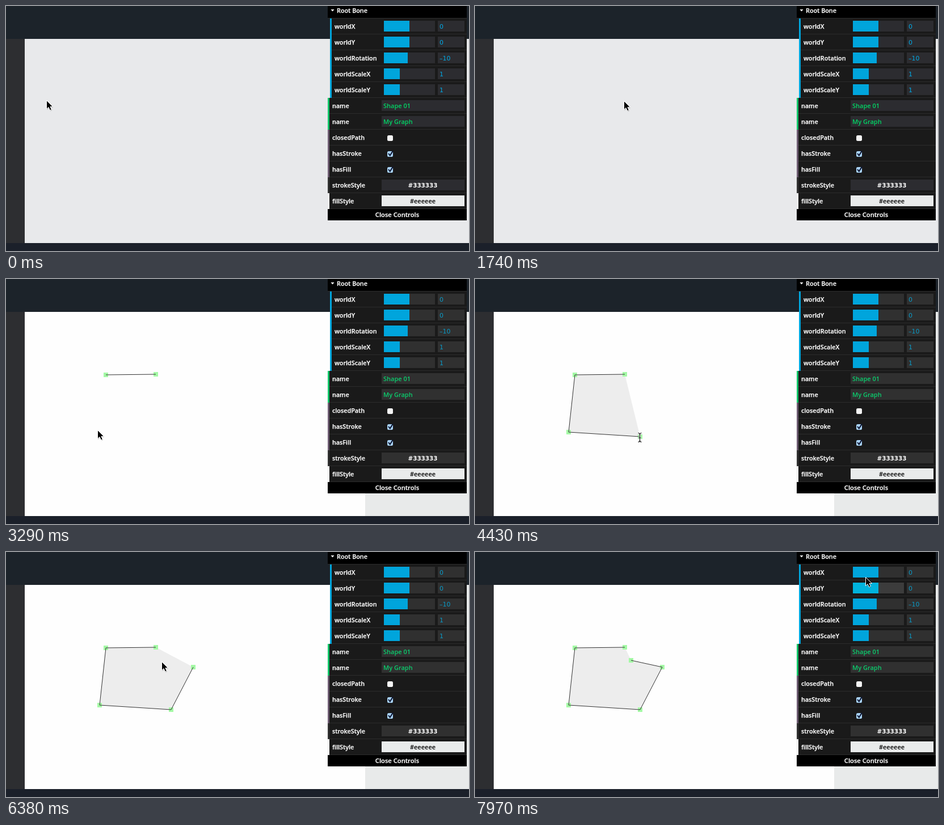
These frames come from a looping animation (816x432 px, 8 s). An HTML page:

```html
<!DOCTYPE html>
<html lang="en">
<head>
<meta charset="utf-8">
<title>Shape editor</title>
<style>
  html, body { margin: 0; width: 100%; height: 100%; overflow: hidden; background: #1c232a; }
  svg { display: block; width: 816px; height: 432px;
    --page: #e8e9eb; --field: #2c2c30; --num: #00aae6; --str: #00d866; }
  svg.drawing { --page: #e8eaea; --field: #303030; --num: #0a9bc8; --str: #0acf6e; }
  text { font: 600 10.8px "Open Sans", "Noto Sans", sans-serif; fill: #fff; }
  .row-label { stroke: #fff; stroke-width: .25; }
  .num { font: 400 11px "DejaVu Sans", sans-serif; fill: var(--num); }
  .str { fill: var(--str); font-size: 11px; }
  .hex { font: 700 10.4px "DejaVu Sans", sans-serif; }
  .dark { fill: #000; font-size: 11px; }
  .mid { text-anchor: middle; }
  .field { fill: var(--field); }
  .fill { fill: #00a5dc; }
  .hover .track { fill: #3c3c3c; }
  .hover .fill { fill: #00b3dd; }
</style>
</head>
<body>
<svg id="stage" viewBox="0 0 816 432">
  <rect width="816" height="432" fill="#1c232a"/>
  <rect y="58" width="33" height="360" fill="#2d2e31"/>
  <rect x="33" y="58" width="783" height="360" style="fill:var(--page)"/>
  <rect y="418" width="816" height="14" fill="#1b202a"/>
  <g id="board">
    <rect x="33" y="58" width="600" height="360" fill="#fefefe"/>
    <polygon id="area" fill="#ededed"/>
    <g id="dots" fill="#a4f9a5"></g>
    <polyline id="line" fill="none" stroke="#333"/>
  </g>
  <g id="panel"></g>
  <g id="arrow">
    <path d="M0 0V15.2L3.5 12L6 17.4L8.8 16.2L6.4 11H11Z" transform="translate(.8 1.4)" opacity=".22"/>
    <path d="M0 0V15.2L3.5 12L6 17.4L8.8 16.2L6.4 11H11Z" stroke="#fff"/>
  </g>
  <g id="beam" fill="none">
    <path class="beam" stroke="#fff" stroke-width="2.6"/>
    <path class="beam" stroke="#111" stroke-width="1.2"/>
  </g>
</svg>
<script>
const NS = "http://www.w3.org/2000/svg";
const $ = id => document.getElementById(id);

function add(parent, tag, attrs, text) {
  const el = document.createElementNS(NS, tag);
  for (const k in attrs) el.setAttribute(k, attrs[k]);
  if (text !== undefined) el.textContent = text;
  parent.append(el);
  return el;
}
const rect = (g, x, y, width, height, more) => add(g, "rect", { x, y, width, height, ...more });
const label = (g, x, y, text, cls = "row-label") => add(g, "text", { x, y, class: cls }, text);

// Control panel
const rows = [
  ["slider", "worldX", "0", .5],
  ["slider", "worldY", "0", .5],
  ["slider", "worldRotation", "\u201310", .47],
  ["slider", "worldScaleX", "1", .31],
  ["slider", "worldScaleY", "1", .31],
  ["string", "name", "Shape 01"],
  ["string", "name", "My Graph"],
  ["check", "closedPath", false],
  ["check", "hasStroke", true],
  ["check", "hasFill", true],
  ["color", "strokeStyle", "#333333"],
  ["color", "fillStyle", "#eeeeee"]
];
const edges = { slider: "#00a5dc", string: "#12c468", check: "#6c5b70" };

const parts = {
  slider(g, y, value, share) {
    rect(g, 666, y + 4, 90, 19, { class: "field track" });
    rect(g, 666, y + 4, Math.round(90 * share), 19, { class: "fill" });
    rect(g, 761, y + 4, 47, 19, { class: "field" });
    label(g, 764, y + 18, value, "num");
  },
  string(g, y, value) {
    rect(g, 662, y + 4, 146, 19, { class: "field" });
    label(g, 665, y + 18, value, "str");
  },
  check(g, y, on) {
    rect(g, 672, y + 10, 10, 10, { rx: 2.5, fill: on ? "#a9d3f8" : "#f4f4f4" });
    if (on) add(g, "path", { d: `M674 ${y + 14}l2.8 3.6l5 -8`, fill: "none", stroke: "#0b1430", "stroke-width": 2 });
  },
  color(g, y, value) {
    const light = value === "#eeeeee";
    rect(g, 662, y + 4, 146, 19, light ? { fill: "#e9ebeb" } : { class: "field" });
    label(g, 734.5, y + 18, value, light ? "mid dark" : "mid hex");
  }
};

const panel = $("panel");
rect(panel, 567, 0, 245, 21);
rect(panel, 567, 21, 245, 1, { fill: "#2c2c2c" });
add(panel, "path", { d: "M572.5 6H578.5L575.5 9.5Z", fill: "#fff" });
label(panel, 583, 12, "Root Bone");
const rowEls = rows.map(([type, name, ...args], i) => {
  const g = add(panel, "g", {}), y = 22 + 28 * i;
  const x = type === "slider" ? 571 : 567;
  rect(g, x, y, 812 - x, 27, { fill: "#1a1a1a" });
  rect(g, x, y + 27, 812 - x, 1, { fill: "#2c2c2c" });
  rect(g, x, y, 3, 28, { fill: edges[type] || args[0] });
  label(g, x + 8, y + 18, name);
  parts[type](g, y, ...args);
  return g;
});
rect(panel, 567, 358, 245, 20);
label(panel, 689.5, 372, "Close Controls", "row-label mid").style.fontSize = "11.2px";

for (const p of document.querySelectorAll(".beam"))
  p.setAttribute("d", "M287.5 271.5q3 0 3 3v10q0 3 -3 3m6 -16q-3 0 -3 3m0 10q0 3 3 3m-5 -7.500h4");

// Vertices: time added, x, y
const points = [
  [1950, 264, 168], [2670, 176, 169], [3550, 165, 270],
  [4430, 291, 278], [5930, 330, 203], [6740, 275, 191]
];
const dots = points.map(([, x, y]) => rect($("dots"), x - 4, y - 4, 8, 8));

// Pointer moves: start and end time, destination, optional bend
const moves = [
  [0, 810, [252, 176]],
  [810, 1740, [262, 168], [129, 156]],
  [1740, 1950, [259, 165]],
  [1950, 2670, [176, 169]],
  [2670, 3290, [161, 267]],
  [3290, 3550, [165, 270]],
  [3550, 4260, [291, 278]],
  [4700, 5570, [328, 206], [594, 245]],
  [5840, 6380, [274, 194], [245, 148]],
  [6650, 7530, [614, 143], [360, 245]],
  [7530, 7970, [688, 45]]
];
const home = [71, 167], step = 88;

function pointerAt(t) {
  const i = moves.findLastIndex(m => m[0] <= t);
  const [from, to, end, bend] = moves[i];
  const begin = i ? moves[i - 1][2] : home;
  const shown = from + Math.floor((t - from) / step) * step;
  const u = t >= to ? 1 : (shown - from) / (to - from);
  const k = (1 - Math.cos(Math.PI * u)) / 2;
  return end.map((e, a) => {
    const b = begin[a], c = bend ? bend[a] : (b + e) / 2;
    return Math.round(b * (1 - k) ** 2 + 2 * c * k * (1 - k) + e * k * k);
  });
}

const show = (el, on) => el.setAttribute("visibility", on ? "visible" : "hidden");

function draw(t) {
  const drawing = t >= 1950, overText = t >= 4260 && t < 4790;
  const live = points.filter(p => p[0] <= t);
  const coords = live.map(([, x, y]) => `${x},${y}`).join(" ");
  $("stage").setAttribute("class", drawing ? "drawing" : "");
  $("board").style.display = drawing ? "" : "none";
  $("area").setAttribute("points", coords);
  $("line").setAttribute("points", coords);
  dots.forEach((d, i) => show(d, i < live.length));
  rowEls[1].setAttribute("class", t >= 7880 ? "hover" : "");
  const [x, y] = pointerAt(t);
  $("arrow").setAttribute("transform", `translate(${x + .5} ${y - .5})`);
  show($("arrow"), !overText);
  show($("beam"), overText);
}

const start = performance.now();
function frame(now) {
  draw(Math.max(0, now - start) % 8000);
  requestAnimationFrame(frame);
}
draw(0);
requestAnimationFrame(frame);
</script>
</body>
</html>
```
